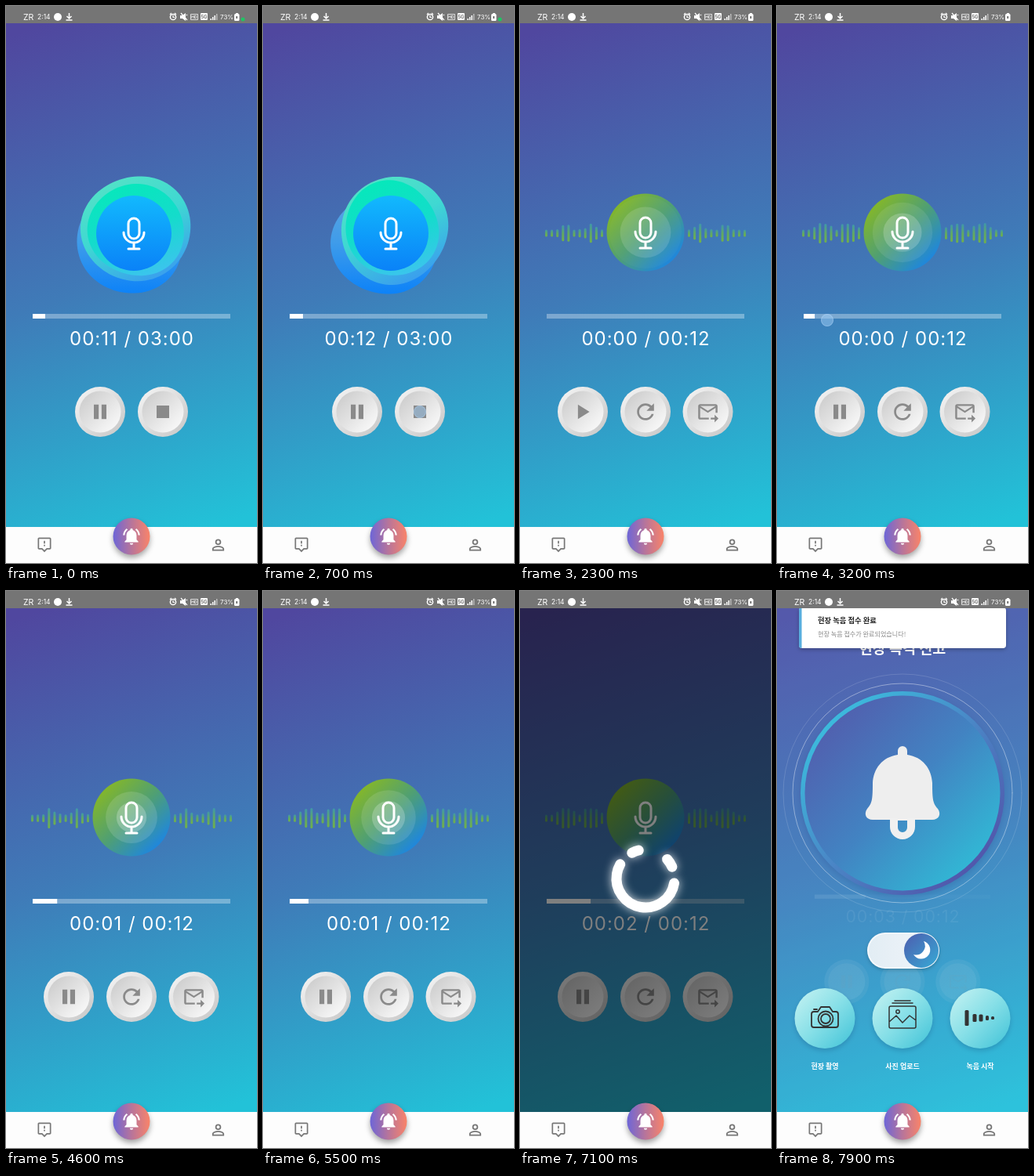
Animation, 320 px wide and 711 px high, one loop 8 s. Source, as an HTML page with a canvas:

```html
<!DOCTYPE html>
<html lang="ko">
<head>
<meta charset="utf-8">
<style>
html, body { margin: 0; width: 100%; height: 100%; overflow: hidden; }
canvas { display: block; width: 100%; height: 100%; }
</style>
</head>
<body>
<canvas></canvas>
<script>
const W = 320, H = 711, LOOP = 8000, TAU = Math.PI * 2;
const canvas = document.querySelector('canvas'), ctx = canvas.getContext('2d');
const KOREAN = '"Noto Sans CJK KR", "Noto Sans CJK", sans-serif', LATIN = 'Inter, sans-serif';

const ICONS = {
  refresh: 'M17.65 6.35C16.2 4.9 14.21 4 12 4c-4.42 0-8 3.58-8 8s3.58 8 8 8c3.73 0 6.84-2.55 7.73-6h-2.08c-.82 2.33-3.04 4-5.65 4-3.31 0-6-2.69-6-6s2.69-6 6-6c1.66 0 3.14.69 4.22 1.78L13 11h7V4z',
  send: 'M20 4H4c-1.1 0-2 .9-2 2v12c0 1.1.9 2 2 2h9v-2H4V8l8 5 8-5v5h2V6c0-1.1-.9-2-2-2zm-8 7L4 6h16zm7 4l4 4-4 4v-3h-4v-2h4z',
  play: 'M7 4.5v15L19 12z',
  pause: 'M5.5 4.5h5v15h-5zM13.5 4.5h5v15h-5z',
  stop: 'M5.5 5.5h13v13h-13z',
  note: 'M20 2H4c-1.1 0-2 .9-2 2v14c0 1.1.9 2 2 2h4l4 4 4-4h4c1.1 0 2-.9 2-2V4c0-1.1-.9-2-2-2zm0 16h-4.8L12 21.200 8.800 18H4V4h16zM11 13h2v2h-2zM11 7h2v4h-2z',
  person: 'M12 5.9a2.1 2.1 0 010 4.2a2.1 2.1 0 010-4.2m0 9c2.97 0 6.1 1.46 6.1 2.1v1.1H5.9V17c0-.64 3.13-2.1 6.1-2.1M12 4a4 4 0 000 8a4 4 0 000-8zm0 9c-2.67 0-8 1.34-8 4v3h16v-3c0-2.66-5.33-4-8-4z',
  alert: 'M7.58 4.08L6.15 2.65C3.75 4.48 2.17 7.3 2.03 10.5h2c.15-2.65 1.51-4.97 3.55-6.42zm12.39 6.42h2c-.15-3.2-1.73-6.02-4.12-7.85l-1.42 1.43c2.02 1.45 3.39 3.77 3.54 6.42zM18 11c0-3.07-1.64-5.64-4.5-6.32V4a1.5 1.5 0 00-3 0v.68C7.63 5.36 6 7.92 6 11v5l-2 2v1h16v-1l-2-2zm-6 11a2 2 0 002-2h-4a2 2 0 002 2z'
};

const clamp = v => Math.max(0, Math.min(1, v));
const ease = v => 1 - (1 - clamp(v)) ** 2;
const frac = v => v - Math.floor(v);

// Linear interpolation through [time, value] points.
function track(t, points) {
  let i = 1;
  while (i < points.length - 1 && t >= points[i][0]) i++;
  const [t0, a] = points[i - 1], [t1, b] = points[i];
  return a + (b - a) * clamp((t - t0) / (t1 - t0));
}

function gradient(x0, y0, x1, y1, ...colors) {
  const g = ctx.createLinearGradient(x0, y0, x1, y1);
  colors.forEach((c, i) => g.addColorStop(i / (colors.length - 1), c));
  return g;
}
const diagonal = (x, y, r, ...c) => gradient(x - r * .7, y - r * .7, x + r * .7, y + r * .7, ...c);

function rect(x, y, w, h, fill, r = 0) {
  ctx.beginPath();
  ctx.roundRect(x, y, w, h, r);
  ctx.fillStyle = fill;
  ctx.fill();
}
function disc(x, y, r, fill) {
  ctx.beginPath();
  ctx.arc(x, y, r, 0, TAU);
  ctx.fillStyle = fill;
  ctx.fill();
}
function arc(x, y, r, from, to, color, width) {
  ctx.beginPath();
  ctx.arc(x, y, r, from, to);
  ctx.strokeStyle = color;
  ctx.lineWidth = width;
  ctx.stroke();
}
function line(path, color, width) {
  ctx.strokeStyle = color;
  ctx.lineWidth = width;
  ctx.stroke(new Path2D(path));
}
function shape(path, color) {
  ctx.fillStyle = color;
  ctx.fill(new Path2D(path), 'evenodd');
}
function at(x, y, scale, draw) {
  ctx.save();
  ctx.translate(x, y);
  ctx.scale(scale, scale);
  draw();
  ctx.restore();
}
function shadow(blur, dy, color, draw) {
  ctx.save();
  const k = canvas.height / H;
  Object.assign(ctx, { shadowBlur: blur * k, shadowOffsetY: dy * k, shadowColor: color });
  draw();
  ctx.restore();
}
function icon(name, x, y, scale, color) {
  at(x, y, scale, () => {
    ctx.translate(-12, -12);
    shape(ICONS[name], color);
  });
}
function text(str, x, y, font, color, align = 'left', spacing = 0) {
  Object.assign(ctx, { font, fillStyle: color, textAlign: align, letterSpacing: spacing + 'px' });
  ctx.fillText(str, x, y);
}

function mic(x, y) {
  at(x, y, 1, () => {
    ctx.lineCap = 'round';
    line('M-7-12a7 7 0 0114 0v12a7 7 0 01-14 0zM-13-1a13 13 0 0026 0M0 12v8M-7 20h14', '#fff', 3);
  });
}

function button(name, x) {
  const y = 518;
  disc(x, y, 32, diagonal(x, y, 32, '#efefef', '#cdcdcd'));
  disc(x, y, 26.5, diagonal(x, y, 26, '#d0d0d0', '#f6f6f6'));
  icon(name, x, y, name == 'refresh' ? 1.35 : 1.23, '#8a8a8a');
}

function player(done, now, total) {
  const clock = s => '00:' + String(Math.floor(s)).padStart(2, '0');
  rect(34, 393, 252, 6, 'rgba(255,255,255,.32)');
  rect(34, 393, 252 * done, 6, '#fff');
  text(clock(now) + ' / ' + total, 160.5, 433, '400 24px ' + LATIN, '#fff', 'center', 1);
}

function blob(x, y, r, phase, fill) {
  ctx.beginPath();
  for (let i = 0; i < 90; i++) {
    const a = i / 90 * TAU;
    const d = r + 1.8 * Math.sin(2 * a + phase) + Math.sin(3 * a - phase);
    ctx.lineTo(x + d * Math.cos(a), y + d * Math.sin(a));
  }
  ctx.fillStyle = fill;
  ctx.fill();
}

function recording(t) {
  const s = 11.4 + t / 1000, a = t / 500;
  const dx = 2 * Math.cos(a) - 2, dy = 2 * Math.sin(a);
  blob(157 + dx, 301 + dy, 66.5, a, gradient(0, 235, 0, 368, '#5fa5dd', '#3f9cea', '#0c82f8'));
  blob(166 - dx, 284 + dy, 68.5, a + 2, gradient(120, 217, 185, 353, '#55e3c5', '#3fd8d2', '#3a9fee'));
  blob(166 + dx, 286 - dy, 60, -a + 1, gradient(140, 226, 180, 346, '#06e8bb', '#14dccb', '#3cc4ee'));
  disc(163, 290, 48, gradient(0, 242, 0, 338, '#12b9fd', '#0a82f8'));
  mic(163, 290);
  player(s / 180, s, '03:00');
  button('pause', 120);
  button('stop', 200);
}

function wave(t) {
  for (let side = 0; side < 2; side++)
    for (let i = 0; i < 11; i++) {
      const x = side ? 286.5 - i * 7.1 : 33.5 + i * 7.1;
      const beat = .5 + .5 * Math.cos((i - 3.4) * 1.35 + .8 * Math.sin(t / 300 + i * 1.3));
      const h = 9 + Math.min(1, i / 3) * 17 * beat;
      rect(x - 1.5, 290 - h / 2, 3, h, gradient(0, 290 - h / 2, 0, 290 + h / 2, '#3f97ac', '#5fa866', '#70b04c'), 1.5);
    }
}

function ripple(t) {
  const phase = track(t, [[850, -.4], [1400, .1], [3200, 1.78], [4600, 2.67], [5500, 3.71], [6700, 5]]);
  if (t > 6700) return;
  for (const lag of [0, .28]) {
    const p = phase - lag;
    if (p > 0) disc(160, 289, 49 * frac(p), `rgba(255,255,255,${.38 * (1 - frac(p))})`);
  }
}

function position(t) {
  if (t < 3300) return track(t, [[2530, 0], [3300, .77]]);
  if (t < 4900) return track(t, [[3300, 1.43], [4900, 1.5]]);
  return track(t, [[4900, .55], [5500, 1.14], [7100, 2.67], [8000, 3.57]]);
}

function playback(t) {
  const s = position(t);
  wave(t);
  disc(160, 289, 49.5, diagonal(160, 289, 50, '#82b62c', '#4f9f74', '#1f87dc'));
  ripple(t);
  mic(160, 289);
  player(s / 12, s, '00:12');
  button(t < 2530 ? 'play' : 'pause', 80);
  button('refresh', 160);
  button('send', 239.5);
}

function spinner(t) {
  const turn = (t - 7100) / 1100 * TAU, rad = Math.PI / 180;
  ctx.lineCap = 'round';
  shadow(12, 0, 'rgba(255,255,255,.8)', () => {
    for (const [a, b] of [[9, 209], [242, 256], [318, 336]])
      arc(160, 367, 37, a * rad + turn, b * rad + turn, '#fff', 13);
  });
}

function camera() {
  line('M-14-8h5l4-6H6l4 6h4q3 0 3 3v14q0 3-3 3h-28q-3 0-3-3v-14q0-3 3-3zM-14-11h4', '#333', 1.8);
  arc(1, 1, 9.5, 0, TAU, '#333', 1.8);
  arc(1, 1, 6, 0, TAU, '#333', 1.8);
}
function picture() {
  line('M-10-22H10M-13-19H13M-17-13q0-2 2-2h30q2 0 2 2v24q0 2-2 2h-30q-2 0-2-2zM-17 5l9-8 8 9 9-9 8 6', '#333', 1.5);
  arc(-6, -8, 2.2, 0, TAU, '#333', 1.5);
}
function levels() {
  [[-17, 20, 5], [-7, 10, 5], [1, 9, 5], [9, 6, 4], [16, 4, 4]].forEach(([x, h, w]) => rect(x - w / 2, -h / 2, w, h, '#333', 1.5));
}

function home() {
  rect(0, 22, W, 642, 'rgba(110,195,240,.15)');
  ctx.lineCap = ctx.lineJoin = 'round';
  text('현장 목격 신고', 160, 80, '700 18.5px ' + KOREAN, '#fff', 'center');
  arc(160, 258, 152, 0, TAU, 'rgba(255,255,255,.14)', 1);
  arc(160, 258, 140, 0, TAU, 'rgba(255,255,255,.4)', 1);
  shadow(8, 3, 'rgba(30,50,120,.2)', () => disc(160, 258, 130, diagonal(160, 258, 130, '#3cb9dc', '#4a86c6', '#5158ac')));
  disc(160, 258, 124.5, diagonal(160, 258, 124, '#5062b0', '#4283c2', '#32b5d4'));

  // Bell body, then a clapper with a slot.
  shape('M154 209v-5a6 6 0 0112 0v5c20 3 31 18 32 36c0 22 1 26 7 33c5 7 1 14-7 14H122c-8 0-12-7-7-14c6-7 7-11 7-33c1-18 12-33 32-36z', '#eee');
  shape('M144 290h32v11a16 16 0 01-32 0zM154 293v9a6 6 0 0012 0v-9z', '#f0f0f0');

  shadow(4, 2, 'rgba(0,0,0,.2)', () => rect(115, 436, 92, 46, '#f4f8fc', 23));
  rect(117, 438, 88, 42, gradient(117, 0, 205, 0, '#e2edf4', '#f2f5fa'), 21);
  disc(184, 459, 22, diagonal(184, 459, 22, '#4a68b4', '#3a9fd0'));
  shape('M187 447a11.5 11.5 0 11-13 17a11.5 11.5 0 0013-17z', '#fff');

  [['현장 촬영', camera], ['사진 업로드', picture], ['녹음 시작', levels]].forEach(([label, draw], i) => {
    const x = 61 + i * 99;
    shadow(6, 3, 'rgba(20,60,110,.25)', () => disc(x, 545.5, 38.5, diagonal(x, 546, 38, '#b4edef', '#86dfe7', '#54cbdc')));
    at(x, 545, 1, draw);
    text(label, x, 610, '600 9px ' + KOREAN, '#fff', 'center');
  });
}

function toast(t) {
  const y = -30 + 51 * ease((t - 7650) / 250);
  shadow(5, 2, 'rgba(0,0,0,.25)', () => rect(28, y, 264, 52, '#fff', 4));
  rect(28, y, 3.5, 52, '#58aede', [4, 0, 0, 4]);
  text('현장 녹음 접수 완료', 52, y + 19.5, '700 9.3px ' + KOREAN, '#222');
  text('현장 녹음 접수가 완료되었습니다!', 52, y + 36.5, '8.1px ' + KOREAN, '#888');
}

function statusBar(t) {
  rect(0, 0, W, 22, '#757575');
  text('ZR', 22, 17.5, '10.5px ' + LATIN, '#fff');
  text('2:14', 40, 17, '8.5px ' + LATIN, '#fff');
  disc(66, 14, 5, '#fff');
  ctx.lineCap = 'butt';
  line('M80.5 9v7M77.5 13l3 3 3-3M76.5 18h8', '#fff', 1.5);
  arc(213, 14, 3.6, 0, TAU, '#fff', 1.5);
  line('M213 12v2.5h2M209 11l2-2M217 11l-2-2', '#fff', 1.2);
  shape('M222 12h3l4-3v10l-4-3h-3z', '#fff');
  line('M223 9l8 9M230 11l1 1', '#fff', 1.2);
  line('M235.5 10.5h9v7h-9z', '#ddd', 1);
  text('HD', 240, 16, '600 5px ' + LATIN, '#fff', 'center');
  rect(248, 9, 9, 9, '#fff', 1);
  text('5G', 252.5, 15.5, '700 6px ' + LATIN, '#757575', 'center');
  for (let i = 0; i < 4; i++) rect(260.5 + i * 2.5, 16 - i * 2, 1.5, 2 + i * 2, i < 3 ? '#fff' : '#bbb');
  text('73%', 273, 17, '8px ' + LATIN, '#fff');
  rect(293, 9, 3, 2, '#fff');
  rect(291, 10, 6.5, 9, '#fff', 1.5);
  rect(293.2, 13, 2, 3, '#757575');
  if (t < 1000) disc(302, 17, 2.5, '#20c464');
}

function navBar() {
  rect(0, 665, W, 46, '#fdfdfd');
  icon('note', 49, 687, .85, '#777');
  icon('person', 270.5, 688, .95, '#777');
  shadow(7, 4, 'rgba(0,0,0,.35)', () => disc(160, 677, 23.5, gradient(137, 677, 184, 677, '#6f66d6', '#b97599', '#fb8468')));
  icon('alert', 160, 677, 1.08, '#fff');
}

const TOUCHES = [[700, 840, 200, 518], [2400, 2520, 80, 518], [3150, 3350, 64, 401], [6450, 6600, 239, 518]];

function render(t) {
  const leave = ease((t - 7550) / 350);
  rect(0, 22, W, 643, gradient(50, 22, 270, 664, '#50479f', '#3f7bb8', '#22c2d8'));
  ctx.save();
  ctx.globalAlpha = 1 - .92 * leave;
  at(160, 343, 1 - .11 * leave, () => {
    ctx.translate(-160, -343);
    t < 850 ? recording(t) : playback(t);
  });
  ctx.globalAlpha = leave;
  if (leave > 0) home();
  ctx.restore();
  if (t > 6600) rect(0, 22, W, 643, `rgba(0,0,0,${.5 * clamp((t - 6600) / 150) * (1 - leave)})`);
  if (t > 6650 && t < 7550) spinner(t);
  for (const [from, to, x, y] of TOUCHES)
    if (t >= from && t < to) {
      disc(x, y, 8, 'rgba(160,205,245,.5)');
      arc(x, y, 7.5, 0, TAU, 'rgba(190,220,255,.35)', 1);
    }
  if (t > 7650) toast(t);
  navBar();
  statusBar(t);
}

const start = performance.now();
function frame() {
  const w = Math.round(innerWidth * devicePixelRatio), h = Math.round(innerHeight * devicePixelRatio);
  if (canvas.width != w || canvas.height != h) {
    canvas.width = w;
    canvas.height = h;
  }
  ctx.setTransform(w / W, 0, 0, h / H, 0, 0);
  render((performance.now() - start) % LOOP);
  requestAnimationFrame(frame);
}
frame();
</script>
</body>
</html>
```
